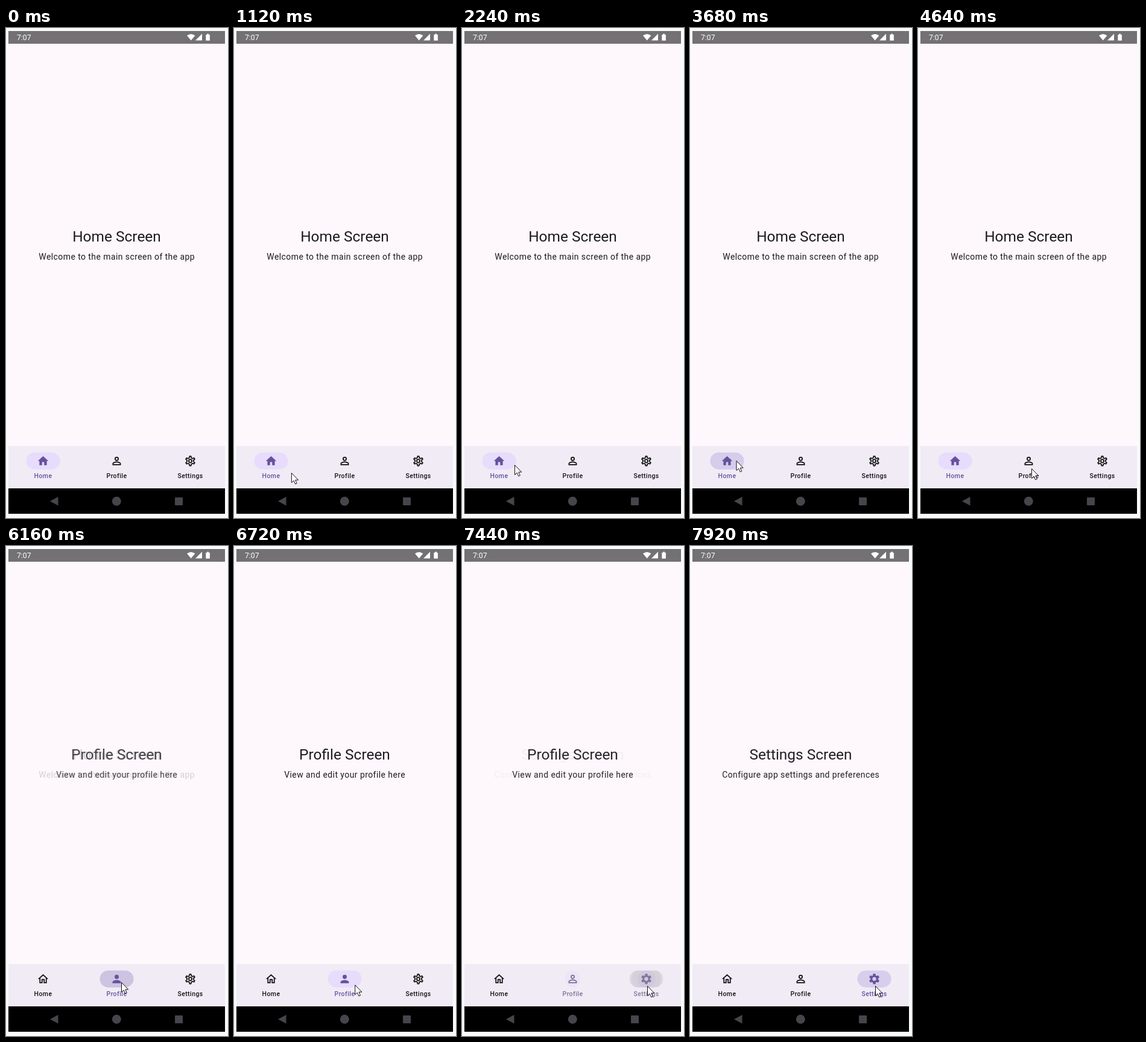
An HTML page for the animation above (8 s loop, 368 by 810 pixels).

```html
<!DOCTYPE html>
<html lang="en">
<head>
<meta charset="utf-8">
<title>Bottom navigation</title>
<style>
  html, body { margin: 0; width: 100%; height: 100%; overflow: hidden; background: #f9fafc; }
  svg { display: block; width: 100%; height: 100%; font-family: Roboto, sans-serif; }
  .title { font-size: 24.46px; }
  .body { font-size: 13.98px; letter-spacing: .437px; }
  .label { font-size: 10.48px; font-weight: 500; letter-spacing: .437px; }
  .screen, .tab { text-anchor: middle; }
</style>
</head>
<body>
<svg id="stage" viewBox="0 0 368 810">
  <defs>
    <radialGradient id="soft">
      <stop offset="0" stop-color="#1d1b20"/>
      <stop offset=".65" stop-color="#1d1b20"/>
      <stop offset="1" stop-color="#1d1b20" stop-opacity="0"/>
    </radialGradient>
    <clipPath id="pillClip"><rect x="-27.95" y="-13.98" width="55.9" height="27.96" rx="13.98"/></clipPath>
  </defs>
  <rect width="368" height="810" fill="#f9fafc"/>
  <rect x="4" y="5" width="359" height="798" fill="#fef8fc"/>
  <rect x="4" y="5" width="359" height="21" fill="#737173"/>
  <g fill="#fff">
    <text x="18" y="20" font-size="12.23">7:07</text>
    <path d="M306.7 20.5L300 12.6Q306.7 7.4 313.4 12.6Z"/>
    <path d="M314 20.5H325V9.5Z"/>
    <path d="M331.3 11h2v-1.4h2.6V11h2v9.8h-6.6z"/>
  </g>
  <g id="screens" fill="#1d1b20"></g>
  <rect x="4" y="691" width="359" height="70" fill="#f0ebf5"/>
  <g id="tabs"></g>
  <rect x="4" y="761" width="359" height="42" fill="#000"/>
  <g fill="#47454b">
    <path d="M73 782.3L86.5 775V789.6Z"/>
    <circle cx="183.3" cy="782.2" r="7.5"/>
    <rect x="280" y="776" width="13" height="13" rx="1"/>
  </g>
  <path id="cursor" d="M.5 .5V16.5L4.2 13.1L6.7 18.8L9.3 17.7L6.8 12.1H11.7Z" fill="#fff" stroke="#111" stroke-linejoin="round"/>
</svg>
<script>
const LOOP = 8000, STEP = 80;
const HIDDEN = [17, 17, 17], MID = [135, 124, 159], ACTIVE = [100, 82, 157];

// Six-toothed wheel: each corner is [degrees from the tooth axis, radius].
function gear(tip, root) {
  const points = [];
  for (let axis = 0; axis < 360; axis += 60)
    for (const [side, [angle, radius]] of [[-1, root], [-1, tip], [1, tip], [1, root]]) {
      const a = (axis + side * angle) * Math.PI / 180;
      points.push((12 + radius * Math.sin(a)).toFixed(2) + ' ' + (12 - radius * Math.cos(a)).toFixed(2));
    }
  return 'M' + points.join('L') + 'Z';
}

const circle = r => `M${12 - r} 12a${r} ${r} 0 1 0 ${2 * r} 0a${r} ${r} 0 1 0 ${-2 * r} 0z`;
const solid = d => `<path fill="currentColor" fill-rule="evenodd" d="${d}"/>`;
const line = d => `<path fill="none" stroke="currentColor" stroke-width="2" stroke-linejoin="round" d="${d}"/>`;

const TABS = [
  { name: 'Home', x: 61.5, text: 'Welcome to the main screen of the app',
    on: solid('M10 20v-6h4v6h5v-8h3L12 3 2 12h3v8z'),
    off: solid('M12 5.69l5 4.5V18h-2v-6H9v6H7v-7.81zM12 3L2 12h3v8h6v-6h2v6h6v-8h3z') },
  { name: 'Profile', x: 183.5, text: 'View and edit your profile here',
    on: solid('M8 8a4 4 0 1 0 8 0a4 4 0 1 0-8 0zM12 14c-2.67 0-8 1.34-8 4v2h16v-2c0-2.66-5.33-4-8-4z'),
    off: line('M9 8a3 3 0 1 0 6 0a3 3 0 1 0-6 0z') +
      solid('M12 13c-2.67 0-8 1.34-8 4v3h16v-3c0-2.66-5.33-4-8-4zm0 2c2.7 0 5.8 1.29 6 2v1H6v-1c.2-.71 3.3-2 6-2z') },
  { name: 'Settings', x: 305.5, text: 'Configure app settings and preferences',
    on: solid(gear([12, 10.1], [22.5, 7.2]) + circle(3.6)),
    off: line(gear([8.5, 9.1], [17.5, 6.3]) + circle(3)) }
];

// Page changes: tab index, start of the page fade, start of the tab change.
const SWITCHES = [{ to: 1, fade: 5785, tab: 5805 }, { to: 2, fade: 7350, tab: 7403 }];
const TAPS = [{ tab: 0, at: 3100 }, { tab: 1, at: 5740 }, { tab: 2, at: 7320 }];

// Pointer stops: time, x, y.
const POINTER = [
  [80, 357, 590], [880, 96, 736], [1760, 90, 731], [2240, 87, 722], [2800, 84, 721],
  [3120, 76.5, 715], [3680, 76.5, 715], [4080, 135, 742], [4480, 188, 730], [4640, 188, 728],
  [5120, 188, 728], [5360, 191, 721], [6640, 191, 721], [6960, 250, 748], [7280, 307, 727], [8000, 307, 727]
];

const clamp = v => Math.min(1, Math.max(0, v));
const mix = (a, b, p) => a + (b - a) * p;

// cubic-bezier(.4, 0, .2, 1)
function ease(x) {
  x = clamp(x);
  if (x === 0 || x === 1) return x;
  let low = 0, high = 1, u = .5;
  for (let i = 0; i < 24; i++) {
    u = (low + high) / 2;
    if (1.2 * u * (1 - u) ** 2 + .6 * u * u * (1 - u) + u ** 3 < x) low = u; else high = u;
  }
  return 3 * u * u * (1 - u) + u ** 3;
}

function tint(p) {
  const [a, b, q] = p < .5 ? [HIDDEN, MID, p * 2] : [MID, ACTIVE, p * 2 - 1];
  return `rgb(${a.map((v, i) => Math.round(mix(v, b[i], q)))})`;
}

// Share of page or tab i at time t, for the given kind of change.
function share(i, t, kind, duration) {
  let value = i === 0 ? 1 : 0;
  for (const s of SWITCHES) {
    const p = ease((t - s[kind]) / duration);
    value = mix(value, s.to === i ? 1 : 0, p);
  }
  return value;
}

function pointerAt(t) {
  const i = Math.max(1, POINTER.findIndex(p => p[0] > t));
  const [t0, x0, y0] = POINTER[i - 1], [t1, x1, y1] = POINTER[i];
  const p = clamp((t - t0) / (t1 - t0)), q = p * p * (3 - 2 * p);
  return [mix(x0, x1, q), mix(y0, y1, q)];
}

const byId = id => document.getElementById(id);
const cursor = byId('cursor');

byId('screens').innerHTML = TABS.map(tab => `
  <g class="screen">
    <text class="title" x="183.5" y="353">${tab.name} Screen</text>
    <text class="body" x="183.7" y="383">${tab.text}</text>
  </g>`).join('');

byId('tabs').innerHTML = TABS.map(tab => `
  <g class="tab" transform="translate(${tab.x} 715.7)">
    <rect class="pill" y="-13.98" height="27.96" rx="13.98" fill="#e8dcfd"/>
    <g clip-path="url(#pillClip)"><circle class="ripple" fill="url(#soft)"/></g>
    <g class="on" transform="scale(.8735) translate(-12 -12)">${tab.on}</g>
    <g class="off" transform="scale(.8735) translate(-12 -12)">${tab.off}</g>
    <text class="label" y="27.9" fill="currentColor">${tab.name}</text>
  </g>`).join('');

const screens = [...document.querySelectorAll('.screen')];
const tabs = [...document.querySelectorAll('.tab')].map(root => {
  const part = name => root.querySelector('.' + name);
  return { root, pill: part('pill'), ripple: part('ripple'), on: part('on'), off: part('off') };
});

function drawTab(i, t) {
  const { root, pill, ripple, on, off } = tabs[i];
  const p = share(i, t, 'tab', 100), width = 55.9 * p;
  const selected = SWITCHES.reduce((now, s) => t >= s.tab ? s.to : now, 0) === i;
  root.style.color = tint(p);
  pill.setAttribute('x', -width / 2);
  pill.setAttribute('width', width);
  pill.style.opacity = p;
  on.style.display = selected ? '' : 'none';
  off.style.display = selected ? 'none' : '';

  const age = t - TAPS.find(tap => tap.tab === i).at;
  const grow = clamp(age / 450), fade = 1 - clamp((age - 450) / 375);
  ripple.setAttribute('r', mix(22, 46, Math.sqrt(grow)));
  ripple.style.opacity = age < 0 ? 0 : .13 * clamp(age / 75) * fade;
}

function draw(t) {
  screens.forEach((el, i) => { el.style.opacity = share(i, t, 'fade', 700); });
  tabs.forEach((_, i) => drawTab(i, t));
  const [x, y] = pointerAt(t);
  cursor.style.display = t < POINTER[0][0] ? 'none' : '';
  cursor.setAttribute('transform', `translate(${x.toFixed(1)} ${y.toFixed(1)})`);
}

const start = performance.now();
function tick() {
  const t = (performance.now() - start) % LOOP;
  draw(Math.floor(t / STEP) * STEP);
  requestAnimationFrame(tick);
}
draw(0);
requestAnimationFrame(tick);
</script>
</body>
</html>
```
